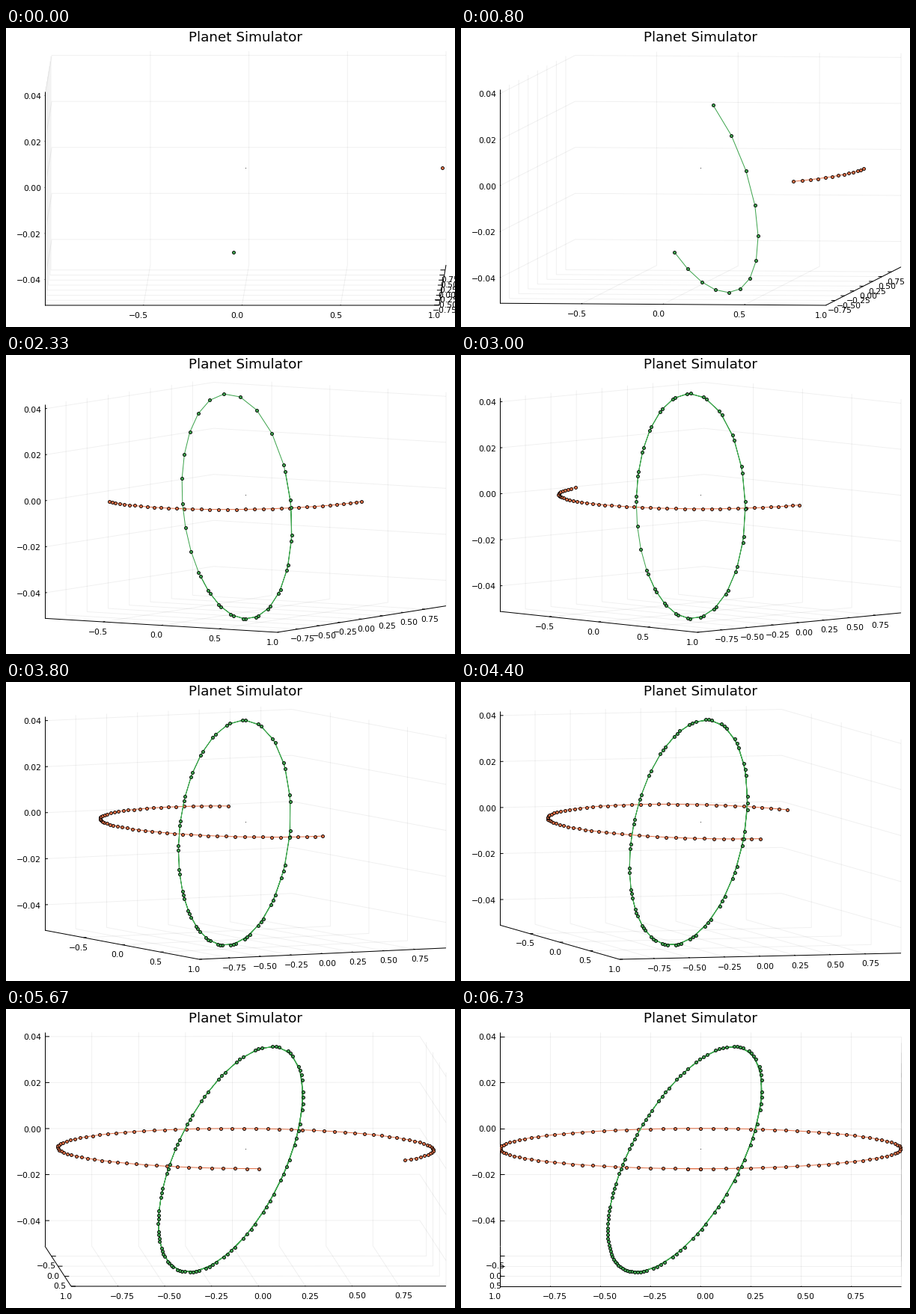
Animation of 600x400 px, one loop 6790 ms. Source, as a matplotlib script:

```python
import numpy as np
import matplotlib.pyplot as plt
from matplotlib.animation import FuncAnimation
from matplotlib.collections import LineCollection
from matplotlib.patches import Rectangle

W, H, DPI = 600, 400, 100
FRAMES, LOOP_MS = 102, 6790
PX = 72 / DPI

# View: the box always fills the plot window
CX, CY = 320.0, 186.7
HALF_W, DEPTH, Z_SCALE = 268, 27, 3078
Z_MIN, Z_MAX = -0.0511, 0.0418
X_TICKS = (-0.5, 0.0, 0.5, 1.0)
Y_TICKS = np.arange(-0.75, 0.8, 0.25)
Z_TICKS = np.arange(-2, 3) * 0.02
TICK = 0.024

plt.rcParams["font.family"] = "DejaVu Sans"


def project(p, phi):
    """Map 3D points to stage pixels for a camera azimuth in radians."""
    x, y, z = np.moveaxis(np.asarray(p, float), -1, 0)
    s, c = np.sin(phi), np.cos(phi)
    u = CX + HALF_W * (x * c + y * s) / (c + s)
    v = CY + DEPTH * (x * s**2 - y * c**2) - Z_SCALE * z
    return np.stack([u, v], axis=-1)


def outer_orbit(k):
    a = -2 * np.pi * k / 100
    return np.stack([np.cos(a), np.sin(a), 0 * a], axis=-1)


def inner_orbit(k):
    """Kepler ellipse with inclination, node and periapsis."""
    a, e = 0.3871, 0.2056
    inc, node, peri = np.radians([7.03, 48.33, 29.12])
    mean = np.radians(189.1 + 14.88 * k)
    ecc = mean.copy()
    for _ in range(30):
        ecc = mean + e * np.sin(ecc)
    px = a * (np.cos(ecc) - e)
    py = a * np.sqrt(1 - e * e) * np.sin(ecc)
    u = px * np.cos(peri) - py * np.sin(peri)
    v = px * np.sin(peri) + py * np.cos(peri)
    w = v * np.cos(inc)
    return np.stack([u * np.cos(node) - w * np.sin(node),
                     u * np.sin(node) + w * np.cos(node),
                     v * np.sin(inc)], axis=-1)


steps = np.arange(FRAMES, dtype=float)
orbits = [outer_orbit(steps), inner_orbit(steps)]

# Grid lines bend from the floor up the back walls
grid = ([[(t, -1, Z_MIN), (t, 1, Z_MIN), (t, 1, Z_MAX)] for t in X_TICKS]
        + [[(1, t, Z_MIN), (-1, t, Z_MIN), (-1, t, Z_MAX)] for t in Y_TICKS]
        + [[(-1, -1, t), (-1, 1, t), (1, 1, t)] for t in Z_TICKS])
frame_lines = [[(-1, -1, Z_MIN), (1, -1, Z_MIN)],
               [(1, -1, Z_MIN), (1, 1, Z_MIN)],
               [(-1, -1, Z_MIN), (-1, -1, Z_MAX)]]
frame_lines += [[(t, -1, Z_MIN), (t, -1 + TICK, Z_MIN)] for t in X_TICKS]
frame_lines += [[(1, t, Z_MIN), (1 - TICK, t, Z_MIN)] for t in Y_TICKS]
frame_lines += [[(-1, -1, t), (-1, -1 + TICK, t)] for t in Z_TICKS]

fig = plt.figure(figsize=(W / DPI, H / DPI), dpi=DPI, facecolor="white")
ax = fig.add_axes([0, 0, 1, 1])
ax.set(xlim=(0, W), ylim=(H, 0))
ax.axis("off")

grid_art = LineCollection([], colors=[(0, 0, 0, 0.06)], linewidths=PX, zorder=1)
axis_art = LineCollection([], colors="black", linewidths=PX, zorder=2)
ax.add_collection(grid_art)
ax.add_collection(axis_art)

ax.text(CX - 0.5, 18, "Planet Simulator", size=18.4 * PX, ha="center")
ax.plot([CX], [CY], "o", ms=1.1 * PX, mew=0, color="#333333", snap=False, zorder=3)

window = Rectangle((51.5, 31), 537, 341, transform=ax.transData)
trails = []
for i, color in enumerate(("#e26f46", "#3da44d")):
    line, = ax.plot([], [], "-o", color=color, lw=PX, ms=4 * PX,
                    mec="black", mew=0.85 * PX, snap=False, zorder=4 + i)
    line.set_clip_path(window)
    trails.append(line)


def make_labels(points, values, fmt, dx, dy, ha):
    out = []
    for p, v in zip(points, values):
        text = fmt.format(v + 0.0).replace("-", "\u2212")
        art = ax.text(0, 0, text, size=10.8 * PX, ha=ha, zorder=3)
        out.append((art, p, dx, dy))
    return out


labels = make_labels([(t, -1, Z_MIN) for t in X_TICKS], X_TICKS,
                     "{:.1f}", -6.4, 16.7, "center")
labels += make_labels([(1, t, Z_MIN) for t in Y_TICKS], Y_TICKS,
                      "{:.2f}", 6.2, 16.7, "center")
labels += make_labels([(-1, -1, t) for t in Z_TICKS], Z_TICKS,
                      "{:.2f}", -5, 4.6, "right")


def update(i):
    phi = np.radians(min(i + 1, 90))
    grid_art.set_segments([project(s, phi) for s in grid])
    axis_art.set_segments([project(s, phi) for s in frame_lines])
    for art, p, dx, dy in labels:
        art.set_position(project(p, phi) + (dx, dy))
    for line, orbit in zip(trails, orbits):
        line.set_data(*project(orbit[:i + 1], phi).T)
    return [grid_art, axis_art, *trails]


anim = FuncAnimation(fig, update, frames=FRAMES, interval=LOOP_MS / FRAMES,
                     repeat=True, repeat_delay=0, blit=False)
plt.show()
```
